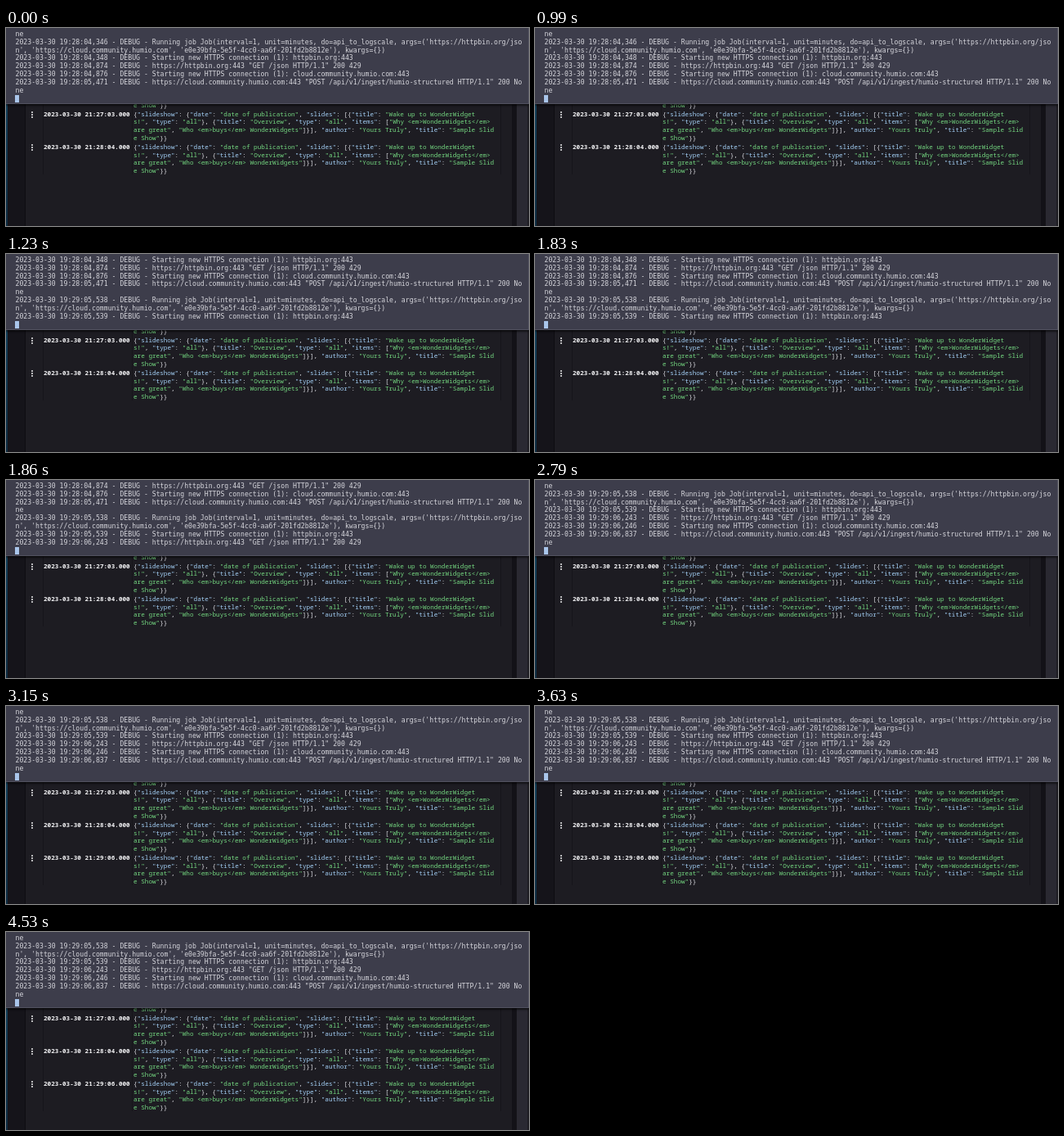
These frames come from a looping animation (640x242 px, 4.59 s). An HTML page:

```html
<!DOCTYPE html>
<html lang="en">
<meta charset="utf-8">
<title>Log shipping</title>
<style>
  html, body { margin: 0; width: 100%; height: 100%; overflow: hidden; background: #1d1c22; }
  #stage { position: relative; width: 640px; height: 242px; overflow: hidden; }
  #stage div, pre { position: absolute; margin: 0; white-space: pre; }
  .panel { top: 90px; height: 152px; }
  #edge { left: 0; width: 2px; background: linear-gradient(#12405a, #0d2c42); }
  #side { left: 2px; width: 21px; background: #15141a; border-right: 1px solid #0e0d12; }
  #gutter { left: 619px; width: 6px; background: #131218; }
  #bar { left: 625px; width: 13px; background: #2a2932; border-right: 2px solid #1d1c22; }
  #term { left: 0; top: 0; width: 639px; height: 92px; background: #3d3d4b;
    border-bottom: 1px solid #51515f; border-right: 1px solid #51515f; box-shadow: 0 1px 3px #000; }
  #out { left: 11.5px; top: 2.8px; color: #d6d6dc; font: 8.18px/9.88px "DejaVu Sans Mono", monospace; }
  #cursor { left: 11px; top: 82px; width: 5px; height: 9px; background: #a9c5ea; }
  .row { left: 0; width: 640px; height: 40px; color: #dcdde2; font: 500 7.67px/9.8px "Noto Sans Mono", monospace; }
  .row .time { left: 46px; color: #f4f4f6; font-weight: 600; }
  .row .json { left: 156px; }
  .dot { left: 31px; width: 2px; height: 2px; border-radius: 1px; background: #f0f0f2; }
  .line { top: -5px; width: 1px; height: 43px; background: #16151a; }
  .key { color: #a3cff5; }
  .str { color: #74d780; }
</style>
<div id="stage">
  <div id="edge" class="panel"></div>
  <div id="side" class="panel"></div>
  <div id="gutter" class="panel"></div>
  <div id="bar" class="panel"></div>
  <div id="rows"></div>
  <div id="term"><pre id="out"></pre><div id="cursor"></div></div>
</div>
<script>
const LOOP = 4590, VISIBLE = 8;
const $ = id => document.getElementById(id);

const log = (time, text) => `2023-03-30 19:${time} - DEBUG - ${text}`;
const connect = (time, host) => log(time, `Starting new HTTPS connection (1): ${host}:443`);

// Terminal output of one scheduled job
const job = (start, open, got, next, posted) => [
  log(start, "Running job Job(interval=1, unit=minutes, do=api_to_logscale, args=('https://httpbin.org/jso"),
  "n', 'https://cloud.community.humio.com', 'e0e39bfa-5e5f-4cc0-aa6f-201fd2b8812e'), kwargs={})",
  connect(open, "httpbin.org"),
  log(got, 'https://httpbin.org:443 "GET /json HTTP/1.1" 200 429'),
  connect(next, "cloud.community.humio.com"),
  log(posted, 'https://cloud.community.humio.com:443 "POST /api/v1/ingest/humio-structured HTTP/1.1" 200 No'),
  "ne"
];
const lines = [
  "ne",
  ...job("28:04,346", "28:04,348", "28:04,874", "28:04,876", "28:05,471"),
  ...job("29:05,538", "29:05,539", "29:06,243", "29:06,246", "29:06,837")
];

// [time in ms, lines scrolled away]
const scrolls = [[0, 0], [1230, 3], [1860, 4], [1890, 5], [2400, 7]];
const ROW_AT = 3150;

const json = [
  '{"slideshow": {"date": "date of publication", "slides": [{"title": "Wake up to WonderWidget',
  's!", "type": "all"}, {"title": "Overview", "type": "all", "items": ["Why <em>WonderWidgets</em>',
  'are great", "Who <em>buys</em> WonderWidgets"]}], "author": "Yours Truly", "title": "Sample Slid',
  'e Show"}}'
].join("\n");

const escape = s => s.replace(/</g, "&lt;");
const colored = json.replace(/("[^"]*")(:?)/g, (_, s, colon) =>
  `<span class="${colon ? "key" : "str"}">${escape(s)}</span>${colon}`);

// The first row is mostly hidden behind the terminal
$("rows").innerHTML = ["26:02", "27:03", "28:04", "29:06"].map((time, i) =>
  `<div class="row" style="top:${60.6 + 40.1 * i}px">` +
  [45, 154, 605].map(x => `<div class="line" style="left:${x}px"></div>`).join("") +
  [1, 4, 7].map(y => `<div class="dot" style="top:${y}px"></div>`).join("") +
  `<div class="time">2023-03-30 21:${time}.000</div><div class="json">${colored}</div></div>`).join("");
const newRow = $("rows").lastChild;

function draw(now) {
  const t = now % LOOP;
  const top = scrolls.filter(s => s[0] <= t).pop()[1];
  $("out").textContent = lines.slice(top, top + VISIBLE).join("\n");
  newRow.style.visibility = t < ROW_AT ? "hidden" : "visible";
  requestAnimationFrame(draw);
}
draw(0);
</script>
</html>
```
